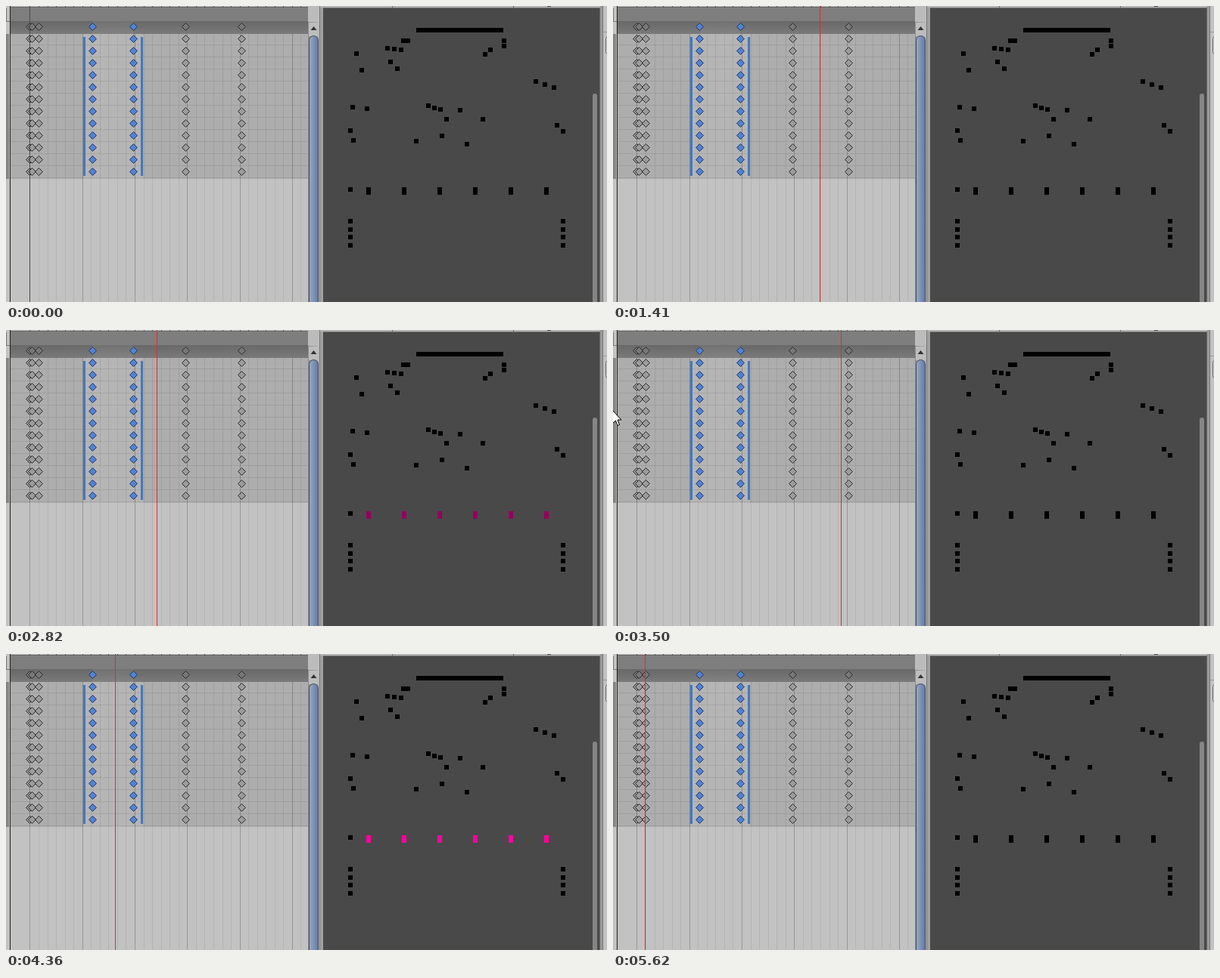
Animation, 794 px wide and 392 px high, one loop 5720 ms. Source, as an HTML page with a canvas:

```html
<!DOCTYPE html>
<html lang="en">
<head>
<meta charset="utf-8">
<title>Animation timeline</title>
<style>
html, body { margin: 0; width: 100%; height: 100%; overflow: hidden; background: #c2c2c2; }
canvas { display: block; }
</style>
</head>
<body>
<canvas id="stage" width="794" height="392"></canvas>
<script>
const W = 794, H = 392, LOOP = 5720;
const screen = document.getElementById('stage').getContext('2d');
const backdrop = document.createElement('canvas');
backdrop.width = W;
backdrop.height = H;
let ctx = backdrop.getContext('2d');

// Timeline geometry: keyframe columns and the looped range
const START = 31, END = 311, FADE_IN = 43, ON = 114, OFF = 168, FADED = 237;
const KEYS = [START, START + 3, FADE_IN, ON, OFF, FADED, END];

// Playhead travel: time, unwrapped x
const PATH = [[480, 140], [1650, 313], [2040, 366], [2820, 479], [3500, 581], [4360, 704], [5620, 882]];
const STEP = 60;

function rect(x, y, w, h, color) {
  ctx.fillStyle = color;
  ctx.fillRect(x, y, w, h);
}

function shape(points, fill, stroke) {
  ctx.beginPath();
  points.forEach(([x, y]) => ctx.lineTo(x, y));
  ctx.closePath();
  ctx.fillStyle = fill;
  ctx.fill();
  if (stroke) {
    ctx.strokeStyle = stroke;
    ctx.stroke();
  }
}

function roundBox(x, y, w, h, r, fill, stroke) {
  ctx.beginPath();
  ctx.roundRect(x, y, w, h, r);
  ctx.fillStyle = fill;
  ctx.fill();
  if (stroke) {
    ctx.strokeStyle = stroke;
    ctx.stroke();
  }
}

function gradient(x0, y0, x1, y1, ...colors) {
  const g = ctx.createLinearGradient(x0, y0, x1, y1);
  colors.forEach((c, i) => g.addColorStop(i / (colors.length - 1), c));
  return g;
}

function diamond(x, y, fill, stroke) {
  shape([[x, y - 5], [x + 5, y], [x, y + 5], [x - 5, y]], fill, stroke);
}

// Evenly spaced small squares, given by the first centre and the spacing
function chain(x, y, dx, dy, n = 2) {
  for (let i = 0; i < n; i++)
    rect(Math.round(x + i * dx) - 3, Math.round(y + i * dy) - 3, 6, 6, '#000');
}

function drawTimeline() {
  rect(0, 0, 419, H, '#c2c2c2');
  rect(0, 37, 4, 192, '#858585');
  rect(0, 3, 1, 17, '#777');
  rect(0, 20, 5, 1, '#777');
  rect(6, 1, 393, 1, '#666');
  rect(6, 2, 393, 18, '#7e7e7e');
  rect(6, 20, 393, 17, gradient(0, 20, 0, 37, '#686868', '#7a7a7a'));
  rect(ON, 20, OFF - ON, 17, 'rgba(255,255,255,.06)');
  rect(6, 37, 393, 192, '#adadad');
  rect(102, 37, 79, 192, '#b5b5b5');
  for (let y = 51; y < 230; y += 16) rect(6, y, 393, 1, 'rgba(0,0,0,.08)');
  for (let i = 0; i < 32; i++) {
    const x = Math.round(START + .4 + i * 11.55);
    rect(x, 37, 1, H, i % 6 ? 'rgba(0,0,0,.07)' : 'rgba(0,0,0,.22)');
    rect(x, 0, 1, 2, '#555');
  }
  rect(5, 0, 1, H, '#222');

  for (const x of [102, 178]) rect(x, 41, 3, 184, '#4478bd');
  for (let y = 27; y < 220; y += 16) {
    for (const x of KEYS) {
      const picked = x === ON || x === OFF;
      const fill = picked ? '#5382d0' : y === 27 ? '#777' : '#9b9b9b';
      diamond(x + .5, y + .5, fill, picked ? '#1f3766' : '#2a2a2a');
    }
  }

  // Scrollbar
  rect(399, 0, 15, H, '#bcbcbc');
  rect(399, 21, 15, H, gradient(399, 0, 414, 0, '#8c8c8c', '#b5b5b5'));
  rect(400, 22, 13, 18, '#bdbdbd');
  shape([[402.5, 32], [406.5, 27], [410.5, 32]], '#333');
  roundBox(400.5, 39.5, 12, H, 6, gradient(400, 0, 413, 0, '#9babc4', '#7d92b4', '#60779d'), '#3d4d68');
  rect(414, 0, 5, H, '#a0a0a0');
  rect(414, 0, 1, H, '#777');
}

function drawScene() {
  rect(419, 0, 366, H, '#494949');
  rect(415, 0, 379, 2, '#b5b5b5');
  rect(419, 2, 366, 1, '#777');
  for (const x of [510, 670]) rect(x, 0, 1, 2, '#666');
  rect(715, 0, 5, 1, '#444');
  roundBox(775, 116, 6, H, 3, '#858585');
  rect(784, 2, 1, H, '#666');
  rect(785, 0, 4, H, '#999');
  rect(788, 0, 1, H, '#777');
  rect(789, 0, 5, H, '#c2c2c2');
  rect(789, 34, 5, 1, '#999');
  roundBox(792.5, 40.5, 10, 23, 3, '#d8d8d8', '#666');

  rect(542, 29, 115, 6, '#000');
  chain(463, 63, 7, 22);
  chain(504, 56, 9, 1, 3);
  chain(525, 46, 6, 0);
  chain(508, 74, 9, 9);
  chain(633, 64, 7, -6);
  chain(658, 46, 0, 7);
  chain(700, 100, 12, 4, 3);
  chain(458, 134, 19, 2);
  chain(558, 132, 8, 2.5, 3);
  chain(600, 138, 9, 45);
  chain(582, 150, 48, 0);
  chain(455, 165, 4, 13);
  chain(542, 179, 34, -7);
  chain(728, 158, 8, 8);
  chain(455, 243, 0, 0, 1);
  for (const x of [455, 736]) chain(x, 285, 0, 10.5, 4);
}

// Moves in held steps, counted afresh from each key point
function playhead(t) {
  const i = PATH.findLastIndex(([time]) => time <= t);
  if (i < 0) return START;
  const [t0, x0] = PATH[i], [t1, x1] = PATH[i + 1] || [LOOP, x0];
  const held = Math.floor((t - t0) / STEP) * STEP;
  const x = x0 + (x1 - x0) * held / (t1 - t0);
  return START + Math.round(x - START) % (END - START);
}

function smooth(a, b, x) {
  const f = Math.min(1, Math.max(0, (x - a) / (b - a)));
  return f * f * (3 - 2 * f);
}

function drawCursor(x, y) {
  const outline = [[0, 0], [0, 17], [4, 13.5], [6.5, 20], [9, 19], [6.5, 12.5], [11.5, 12.5]];
  shape(outline.map(([dx, dy]) => [x + dx, y + dy]), '#fff', '#000');
}

function frame(now) {
  const t = now % LOOP, x = playhead(t);
  const glow = smooth(FADE_IN, ON, x) - smooth(OFF, FADED, x);
  ctx.drawImage(backdrop, 0, 0);
  rect(x, 0, 1, H, t < PATH[0][0] ? '#4c4c4c' : '#fa2020');
  for (let i = 0; i < 6; i++)
    rect(Math.round(476 + i * 46.9), 240, 6, 10, `rgb(${255 * glow},0,${160 * glow})`);
  if (t >= 3420 && t < 3600) drawCursor(-.5, 106.5);
  requestAnimationFrame(() => frame(performance.now() - begin));
}

drawTimeline();
drawScene();
ctx = screen;
const begin = performance.now();
frame(0);
</script>
</body>
</html>
```
